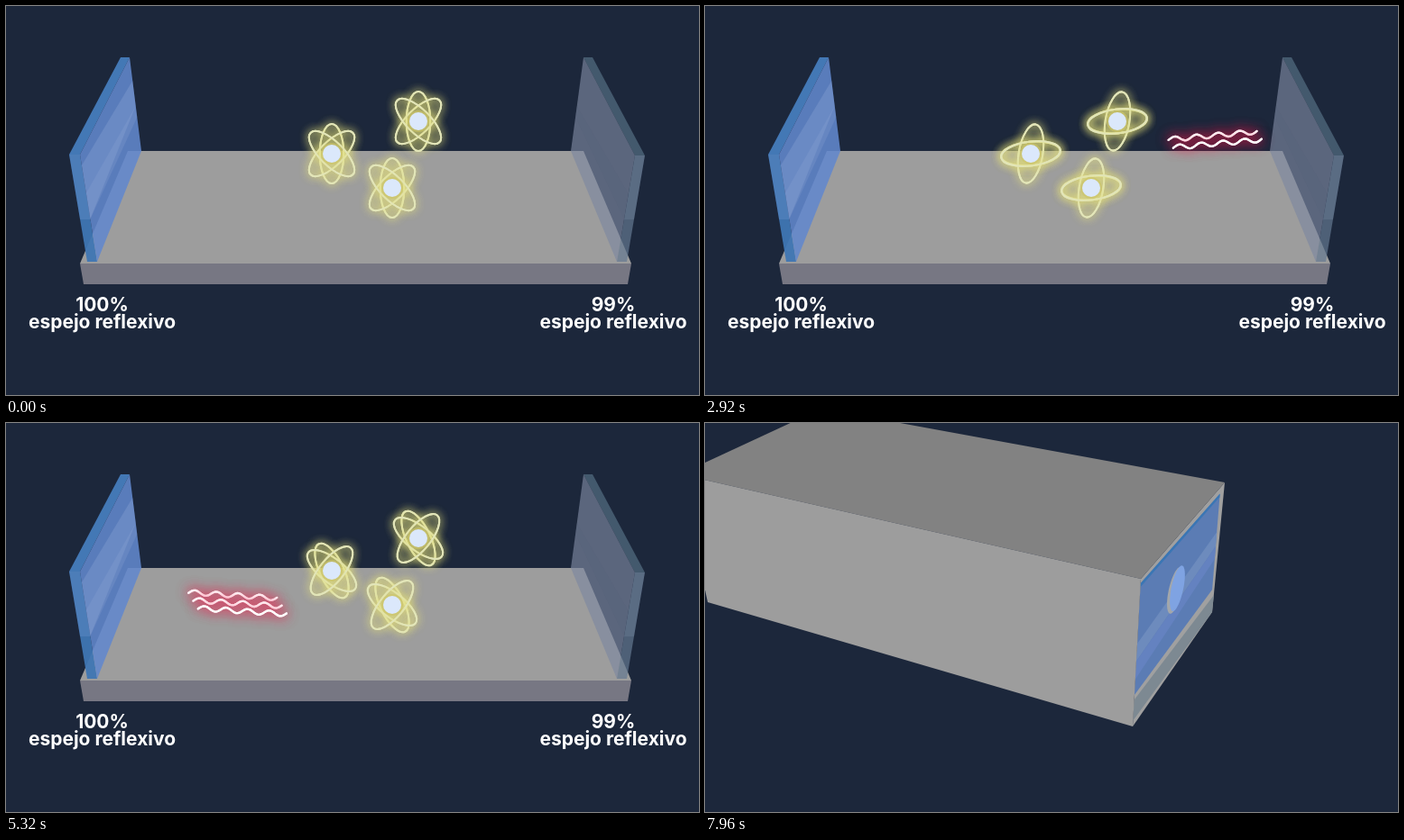
An HTML page with a canvas that plays this animation: 768x432 px, repeating every 8 s.

```html
<!DOCTYPE html>
<html lang="es">
<head>
<meta charset="utf-8">
<title>Cavidad láser</title>
<style>
  html, body { margin: 0; width: 100%; height: 100%; overflow: hidden; background: #1c273b; }
  canvas { display: block; }
</style>
</head>
<body>
<canvas id="stage" width="768" height="432"></canvas>
<script>
const ctx = document.getElementById('stage').getContext('2d');
const LOOP = 8;
const clamp = v => Math.max(0, Math.min(1, v));
const ramp = (t, from, to) => clamp((t - from) / (to - from));
const mix = (a, b, k) => a.map((v, i) => v + (b[i] - v) * k);

function trace(points) {
  ctx.beginPath();
  points.forEach(([x, y]) => ctx.lineTo(x, y));
  ctx.closePath();
}
function poly(color, ...points) {
  trace(points);
  ctx.fillStyle = color;
  ctx.fill();
}

// Point on a quad given as [near top, far top, far bottom, near bottom]
const onQuad = ([a, b, c, d], u, v) => mix(mix(a, b, u), mix(d, c, u), v);

function band(quad, color, v0, v1, v2, v3) {
  poly(color, onQuad(quad, 0, v0), onQuad(quad, 1, v1), onQuad(quad, 1, v2), onQuad(quad, 0, v3));
}

function drawFloor() {
  poly('#9d9d9d', [135, 161], [640, 161], [693, 286], [82, 286]);
  poly('#777783', [82, 286], [693, 286], [689, 309], [86, 309]);
}

function drawMirrors() {
  const left = [[82, 165], [137, 57], [150, 161], [101, 284]];
  poly('rgba(70,125,188,.95)', [70, 165], [127, 57], [137, 57], [82, 165]);
  poly('rgba(64,118,180,.95)', [70, 165], [82, 165], [101, 284], [90, 284]);
  poly('rgba(98,136,205,.88)', ...left);
  band(left, 'rgba(145,170,215,.3)', .1, .25, .52, .6);
  band(left, 'rgba(145,170,215,.22)', .36, .52, .64, .6);
  poly('rgba(110,150,210,.3)', [70, 165], [82, 165], [94, 237], [82, 237]);

  const right = [[697, 166], [640, 57], [626, 161], [677, 284]];
  poly('rgba(85,110,130,.7)', [640, 57], [650, 57], [708, 166], [697, 166]);
  poly('rgba(125,135,160,.65)', ...right);
  poly('rgba(100,120,145,.7)', [697, 166], [708, 166], [688, 284], [677, 284]);
  band(right, 'rgba(85,95,120,.25)', .36, .52, .64, .6);
  poly('rgba(140,155,180,.2)', [697, 166], [708, 166], [696, 237], [685, 237]);
}

function drawLabels(alpha) {
  ctx.globalAlpha = alpha;
  ctx.fillStyle = '#fff';
  ctx.textAlign = 'center';
  ctx.font = '700 21px Inter, sans-serif';
  [[106.5, '100%'], [673, '99%']].forEach(([x, percent]) => {
    ctx.fillText(percent, x, 339);
    ctx.fillText('espejo reflexivo', x, 358);
  });
  ctx.globalAlpha = 1;
}

const ATOMS = [[457, 128], [361, 164], [428, 202]];
const ORBITS = [[0, 29], [45, 49.5], [-45, -18]]; // start angle, degrees per second

function drawAtom([x, y], t) {
  ctx.save();
  ctx.translate(x, y);
  ctx.strokeStyle = '#e2e5b9';
  ctx.lineWidth = 2;
  ctx.shadowColor = '#e4df78';
  for (const [start, rate] of ORBITS) {
    ctx.beginPath();
    ctx.ellipse(0, 0, 13.3, 33, (start + rate * t) * Math.PI / 180, 0, 7);
    ctx.shadowBlur = 0;
    ctx.fillStyle = 'rgba(226,226,150,.1)';
    ctx.fill();
    ctx.shadowBlur = 10;
    ctx.stroke();
    ctx.stroke();
  }
  ctx.fillStyle = 'rgba(205,196,105,.65)';
  ctx.beginPath();
  ctx.arc(0, 0, 12, 0, 7);
  ctx.fill();
  ctx.shadowBlur = 0;
  ctx.fillStyle = '#dbe8fb';
  ctx.beginPath();
  ctx.arc(0, 0, 10, 0, 7);
  ctx.fill();
  ctx.restore();
}

// Each leg: position (x, y) of the first line's left end at time t0.
// "fresh" lines come out of the atom at emitX; the others already exist.
const LEGS = [
  { from: 1.5, to: 3, t0: 2.08, x: 466, y: 130, v: 243, slope: .052, lines: [0, 1], fresh: [0, 1], emitX: 457 },
  { from: 2.3, to: 5.1, t0: 3.8, x: 300, y: 167, v: -243, slope: -.088, lines: [0, 1, 2], fresh: [2], emitX: 361 },
  { from: 4.4, to: 7.5, t0: 5.32, x: 202, y: 188, v: 243, slope: .067, lines: [-1, 0, 1, 2], fresh: [-1], emitX: 428 }
];

function drawWave(x, y, slope) {
  ctx.beginPath();
  for (let s = 0; s <= 98; s += 2) {
    ctx.lineTo(x + s, y + s * slope - 2.7 * Math.sin((s - 1) * Math.PI / 12));
  }
  ctx.stroke();
  ctx.stroke();
}

function drawLight(t) {
  ctx.save();
  // the space between the two mirrors
  trace([[167, 60], [610, 60], [720, 320], [58, 320]]);
  ctx.clip();
  ctx.strokeStyle = '#fff';
  ctx.lineWidth = 2.3;
  ctx.lineCap = 'round';
  ctx.shadowColor = '#f5184a';
  ctx.shadowBlur = 14;
  for (const leg of LEGS) {
    if (t < leg.from || t > leg.to) continue;
    const shift = leg.v * (t - leg.t0);
    for (const i of leg.lines) {
      ctx.save();
      if (leg.fresh.includes(i)) {
        ctx.beginPath();
        ctx.rect(leg.v > 0 ? leg.emitX : 0, 0, leg.v > 0 ? 768 : leg.emitX, 432);
        ctx.clip();
      }
      drawWave(leg.x + shift + i * 5.3, leg.y + shift * leg.slope + i * 8.8, leg.slope);
      ctx.restore();
    }
  }
  ctx.restore();
}

// Case corners: closed pose and turned pose
const CASE = {
  ftl: [[57, 155], [-28, 57]], ftr: [[716, 155], [483, 173]],
  fbl: [[85, 316], [3, 199]], fbr: [[688, 316], [474, 337]],
  btl: [[120, 43], [129, -16]], btr: [[653, 43], [576, 66]],
  bbr: [[640, 161], [562, 210]]
};

function drawDisc(quad, color, u, v, ru, rv) {
  const points = [];
  for (let a = 0; a < 2 * Math.PI; a += .15) {
    points.push(onQuad(quad, u + ru * Math.cos(a), v + rv * Math.sin(a)));
  }
  poly(color, ...points);
}

function drawCase(turn, alpha) {
  const c = {};
  for (const key in CASE) c[key] = mix(...CASE[key], turn);
  if (turn > 0) {
    const end = [c.ftr, c.btr, c.bbr, c.fbr];
    poly('#a0a0a0', ...end);
    const glass = [[0, .03], [.95, .05], [.97, .8], [0, .787]].map(([u, v]) => onQuad(end, u, v));
    poly('#5b7cb4', ...glass);
    band(glass, '#3a76b4', 0, 0, .035, .035);
    band(glass, '#6d8bbd', .54, .4, .55, .7);
    band(glass, '#6482c0', .7, .55, .68, .86);
    drawDisc(end, '#a3a7ab', .46, .4, .1, .15);
    drawDisc(end, '#7fa3e2', .485, .405, .09, .15);
    band(end, '#7d8992', .82, .87, 1, .96);
  }
  ctx.globalAlpha = alpha;
  poly('#828282', c.ftl, c.btl, c.btr, c.ftr);
  poly('#9d9d9d', c.ftl, c.ftr, c.fbr, c.fbl);
  ctx.globalAlpha = 1;
}

function draw(t) {
  ctx.fillStyle = '#1c273b';
  ctx.fillRect(0, 0, 768, 432);
  const closing = ramp(t, 6.9, 7.24);
  if (closing < 1) {
    drawFloor();
    ctx.globalAlpha = closing * .8;
    poly('#8c8c94', [120, 43], [653, 43], [640, 161], [135, 161]);
    ctx.globalAlpha = 1;
    drawMirrors();
    drawLight(t);
    ATOMS.forEach(atom => drawAtom(atom, t));
    drawLabels(1 - ramp(t, 6.8, 7.05));
  }
  if (closing > 0) drawCase(ramp(t, 7.24, 7.96) ** 2, closing);
}

function tick() {
  draw(performance.now() / 1000 % LOOP);
  requestAnimationFrame(tick);
}
tick();
</script>
</body>
</html>
```
